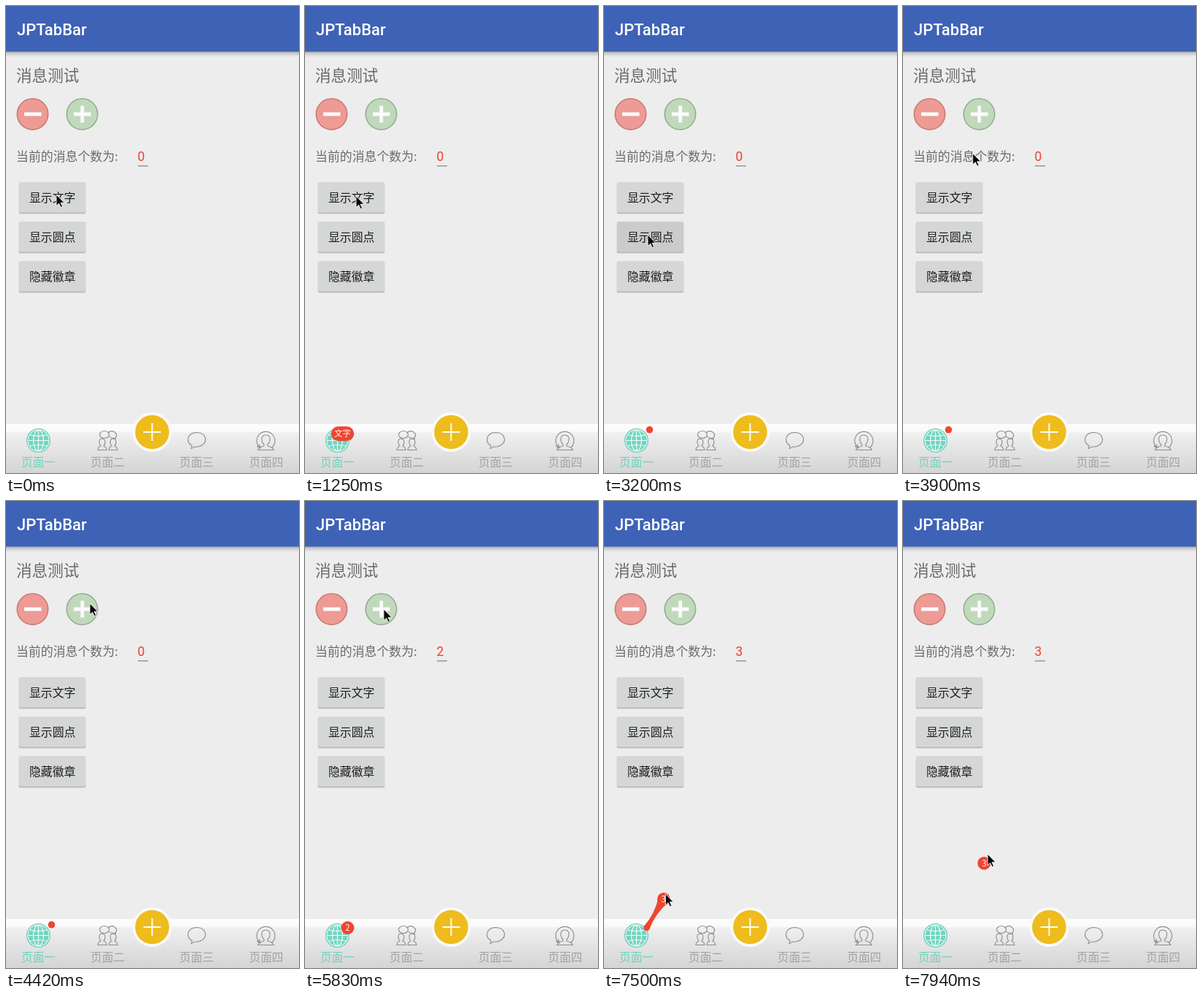
An HTML page that plays this animation: 402x639 px, repeating every 8 s.

```html
<!DOCTYPE html>
<html lang="zh">
<head>
<meta charset="utf-8">
<style>
  html, body { margin: 0; width: 100%; height: 100%; overflow: hidden; background: #ededed; }
  svg { display: block; width: 402px; height: 639px; }
  text { font-family: "Noto Sans CJK SC", "Noto Sans CJK", "Noto Sans", sans-serif; }
  .latin { font-family: Roboto, sans-serif; }
  .mid { text-anchor: middle; }
  .line { fill: none; stroke: #8f8f8f; stroke-width: 1.15; stroke-linecap: round; stroke-linejoin: round; }
</style>
</head>
<body>
<svg viewBox="0 0 402 639">
  <defs>
    <linearGradient id="barFill" x1="0" y1="0" x2="0" y2="1">
      <stop offset="0" stop-color="#fdfdfd"/>
      <stop offset=".15" stop-color="#fafafa"/>
      <stop offset=".18" stop-color="#f0f0f0"/>
      <stop offset="1" stop-color="#d4d4d4"/>
    </linearGradient>
    <linearGradient id="headShade" x1="0" y1="0" x2="0" y2="1">
      <stop offset="0" stop-color="#a9abb0"/>
      <stop offset=".5" stop-color="#d4d4d5"/>
      <stop offset="1" stop-color="#ededed"/>
    </linearGradient>
  </defs>

  <rect width="402" height="639" fill="#ededed"/>
  <rect y="62" width="402" height="8" fill="url(#headShade)"/>
  <rect width="402" height="62.5" fill="#3e62b6"/>
  <text class="latin" x="15" y="39.5" font-size="22" font-weight="500" fill="#fff">JPTabBar</text>

  <text x="14" y="103" font-size="21.6" fill="#6a6a6a">消息测试</text>
  <g stroke-width="1.6">
    <circle cx="36.5" cy="148" r="21.2" fill="#ee9a95" stroke="#c97a73"/>
    <circle cx="104.5" cy="148" r="21.2" fill="#c1d9bb" stroke="#92ae90"/>
  </g>
  <path d="M25 148h23.5M93 148h23.5M104.7 136.5v23" stroke="#fbfbfb" stroke-width="4.8"/>

  <text x="14" y="212" font-size="16.9" fill="#6a6a6a">当前的消息个数为:</text>
  <text id="count" class="latin" x="180.5" y="212" font-size="17.5" fill="#ee4030"></text>
  <path d="M181 218.8h14" stroke="#8a8a8a" stroke-width="1.3"/>

  <g id="buttons"></g>

  <rect y="572" width="402" height="67" fill="url(#barFill)"/>
  <g id="labels" font-size="15.7"></g>

  <g transform="translate(44.5 594.5)" fill="none">
    <circle r="15.8" stroke="#66cdb6" stroke-width="1.3" fill="#eefaf6"/>
    <circle r="14" fill="#72d5c0"/>
    <path d="M0-14V14M-14 0H14M-11.5-7.5Q0-4.5 11.5-7.5M-11.5 7.5Q0 4.5 11.5 7.5" stroke="#f2fbf9" stroke-width="1.2"/>
    <ellipse rx="7" ry="14" stroke="#f2fbf9" stroke-width="1.2"/>
  </g>

  <g class="line" transform="translate(139.5 595)">
    <ellipse cx="-4.5" cy="-8.5" rx="6.5" ry="5"/>
    <path d="M1-11.5Q5-15 9.5-12Q14.500-8 10.500-4.500L11-2.500L8-3.800Q4-3.500 2-6"/>
    <path id="pal" d="M-8-3Q-12-2.500-11.500 2Q-11 6-9.500 7Q-13 8.500-13.500 12.500H-1.500Q-2 8.500-5.500 7Q-3.500 5-3.500 1Q-4-3-8-3Z"/>
    <use href="#pal" x="15"/>
  </g>

  <path class="line" d="M254 605.500Q255.500 603.500 255 601.500C246 596 249 584 261.500 583.500C274 583.500 277 595 269.500 600.500C265.500 603.500 261 603.500 258.500 603Q256.500 605.500 254 605.500Z"/>

  <g class="line" transform="translate(356.5 595)">
    <path d="M-8 9.500A12.500 12.500 0 1 1 8 9.500M-12 7.500L-7.500 10L-9 5"/>
    <path d="M0-8C-4.500-8-6-5-5.500-1Q-5 3-2.500 5V7Q-9 8.500-11 12.500H11Q9 8.500 2.500 7V5Q5 3 5.500-1C6-5 4.500-8 0-8Z"/>
  </g>

  <circle cx="200.500" cy="583" r="27" fill="#fafafa"/>
  <circle cx="200.500" cy="583" r="23.300" fill="#eebc1d"/>
  <path d="M188.500 583h24M200.500 571v24" stroke="#fffdf5" stroke-width="2"/>

  <g id="badge">
    <path id="neck" fill="#f04530"/>
    <circle id="anchor" cx="58.500" cy="584" fill="#f04530"/>
    <rect id="bubble" fill="#f04530"/>
    <text id="badgeText" class="mid" fill="#fff"></text>
  </g>
  <path id="cursor" d="M0 0V15.500L3.600 12.200L6.200 17.600L8.600 16.500L6.100 11.300H11Z" fill="#080808" stroke="#fff" stroke-width=".9"/>
</svg>

<script>
const LOOP = 8000;
const HOME = { x: 58.5, y: 584 };
const DROP = { x: 111.3, y: 495.7 };
const $ = id => document.getElementById(id);
const lerp = (a, b, p) => a + (b - a) * p;
const ease = {
  linear: p => p,
  inOut: p => p * p * (3 - 2 * p),
  out: p => 1 - (1 - p) ** 2
};

$("buttons").innerHTML = ["显示文字", "显示圆点", "隐藏徽章"].map((label, i) => `
  <g transform="translate(18 ${241 + i * 54})">
    <rect x="-.5" y=".5" width="92" height="43" rx="2.500" fill="#cdcdcd"/>
    <rect y="1" width="91" height="42" rx="2" fill="#b9b9b9"/>
    <rect class="face" width="91" height="41.500" rx="2" fill="#d5d7d6"/>
    <text class="mid" x="45.700" y="27" font-size="15.900" fill="#1c1c1c">${label}</text>
  </g>`).join("");
$("labels").innerHTML = [44.5, 139.5, 261.5, 357].map((x, i) =>
  `<text class="mid" x="${x}" y="629.500" fill="${i ? "#a3a3a3" : "#6dd3bd"}">页面${"一二三四"[i]}</text>`).join("");
const faces = document.querySelectorAll(".face");

// Pointer moves: start, last change, number of steps, end point, easing
const moves = [
  [180, 270, 2, 70, 260, "linear"],
  [2500, 2850, 5, 60, 313, "inOut"],
  [3470, 4250, 10, 115, 141, "inOut"],
  [4340, 4420, 2, 115, 140, "linear"],
  [4510, 4600, 2, 108, 147, "linear"],
  [5400, 5480, 2, 108, 148, "linear"],
  [6090, 6520, 6, 50, 527, "inOut"],
  [6610, 6700, 2, 53, 570, "out"],
  [6790, 7060, 4, 59, 581, "out"],
  [7240, 7940, 9, 116, 483, "linear"]
];

function progress(t, start, end, steps) {
  if (t < start) return 0;
  const step = Math.floor((t - start) / (end - start) * (steps - 1) + 0.1) + 1;
  return Math.min(1, step / steps);
}

function pointer(t) {
  let x = 69, y = 258;
  for (const [start, end, steps, toX, toY, curve] of moves) {
    const p = ease[curve](progress(t, start, end, steps));
    x = lerp(x, toX, p);
    y = lerp(y, toY, p);
  }
  return { x, y };
}

function setBubble(x, y, w, h, label, size) {
  const attrs = { x: x - w / 2, y: y - h / 2, width: w, height: h, rx: h / 2 };
  for (const key in attrs) $("bubble").setAttribute(key, attrs[key]);
  const text = $("badgeText");
  text.textContent = label;
  text.setAttribute("x", x);
  text.setAttribute("y", y + size * 0.365);
  text.setAttribute("font-size", size);
}

// Sticky bridge between the resting place and the dragged badge
function setNeck(x, y, pull) {
  const stuck = pull > 0 && pull < 0.7;
  const r = stuck ? lerp(6.5, 1.5, pull) : 0;
  $("anchor").setAttribute("r", r);
  if (!stuck) return $("neck").setAttribute("d", "");
  const dx = x - HOME.x, dy = y - HOME.y, len = Math.hypot(dx, dy);
  const nx = -dy / len, ny = dx / len;
  const mx = HOME.x + dx / 2, my = HOME.y + dy / 2;
  $("neck").setAttribute("d",
    `M${HOME.x + nx * r} ${HOME.y + ny * r}Q${mx} ${my} ${x + nx * 8} ${y + ny * 8}` +
    `L${x - nx * 8} ${y - ny * 8}Q${mx} ${my} ${HOME.x - nx * r} ${HOME.y - ny * r}Z`);
}

function draw(t) {
  const count = [5130, 5740, 6000].filter(at => t >= at).length;
  $("count").textContent = count;
  faces[0].setAttribute("fill", t >= 980 && t < 1250 ? "#d0d2d1" : "#d5d7d6");
  faces[1].setAttribute("fill", t >= 3110 && t < 3470 ? "#cacccb" : "#d5d7d6");

  const pull = progress(t, 7240, 7940, 9);
  const x = lerp(HOME.x, DROP.x, pull), y = lerp(HOME.y, DROP.y, pull);
  $("badge").style.display = t < 980 ? "none" : "";
  if (count) setBubble(x, y, 18, 18, count, 11.3);
  else if (t < 3020) setBubble(51.5, 585.3, 31.5, 20, "文字", 11.2);
  else setBubble(62.5, 579.8, 9.6, 9.6, "", 10);
  setNeck(x, y, pull);

  const tip = pointer(t);
  $("cursor").setAttribute("transform", `translate(${tip.x} ${tip.y})`);
}

const began = performance.now();
function tick() {
  draw((performance.now() - began) % LOOP);
  requestAnimationFrame(tick);
}
tick();
</script>
</body>
</html>
```
